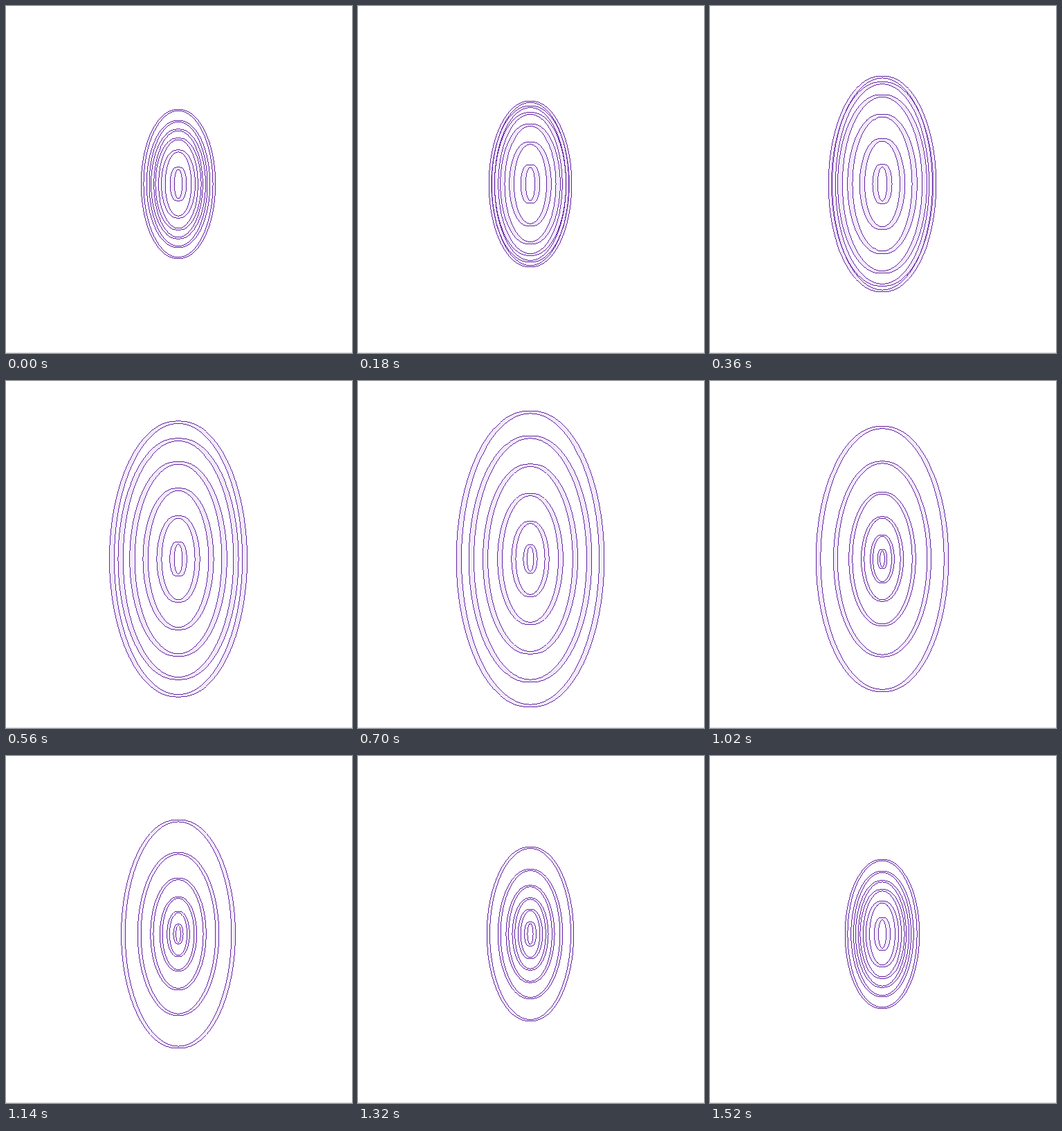
An HTML page for the animation above (1540 ms loop, 500 by 501 pixels).

```html
<!DOCTYPE html>
<html lang="en">
<head>
<meta charset="utf-8">
<title>Pulsing rings</title>
<style>
  html, body { margin: 0; width: 500px; height: 501px; overflow: hidden; background: #fff; }
  svg { display: block; }
  path {
    fill: #e6d5f5; fill-opacity: .5; fill-rule: evenodd;
    stroke: #530f98; stroke-width: .9;
    shape-rendering: crispEdges;
  }
</style>
</head>
<body>
<svg width="500" height="501">
  <rect y="500" width="500" height="1" fill="#ddd"/>
  <g id="rings" transform="translate(249 257)"></g>
</svg>
<script>
const LOOP = 1540;
const LEAD = 95.5; // ms between neighbouring rings
const RINGS = 6;

const group = document.getElementById('rings');
const paths = Array.from({ length: RINGS }, () =>
  group.appendChild(document.createElementNS('http://www.w3.org/2000/svg', 'path')));

// Scale swinging from 1 to 2 and back, a little steeper than a sine.
function pulse(ms) {
  const c = Math.cos(2 * Math.PI * ms / LOOP);
  return 1.5 - 0.5 * c * (1.1 - 0.1 * c * c);
}

// Two half ellipses joined by flat edges reaching `flat` to each side.
function oval(rx, ry, flat) {
  const arc = `A${rx - flat} ${ry} 0 0 1`;
  return `M${-flat} ${-ry}H${flat}${arc} ${flat} ${ry}H${-flat}${arc} ${-flat} ${-ry}Z`;
}

// A ring seen from the side: its depth widens the outer edge only.
function ring(index, ms) {
  const scale = pulse(ms + (RINGS - 1 - index) * LEAD);
  const ry = (14.4 + 18.72 * index) * scale - 0.5;
  const rx = ry / 2;
  return oval(rx, ry, 2 * scale) + oval(rx - 3.7 * scale, ry - 1.8 * scale, 0);
}

const start = performance.now();
function tick() {
  const ms = (performance.now() - start) % LOOP;
  paths.forEach((path, i) => path.setAttribute('d', ring(i, ms)));
  requestAnimationFrame(tick);
}
tick();
</script>
</body>
</html>
```
